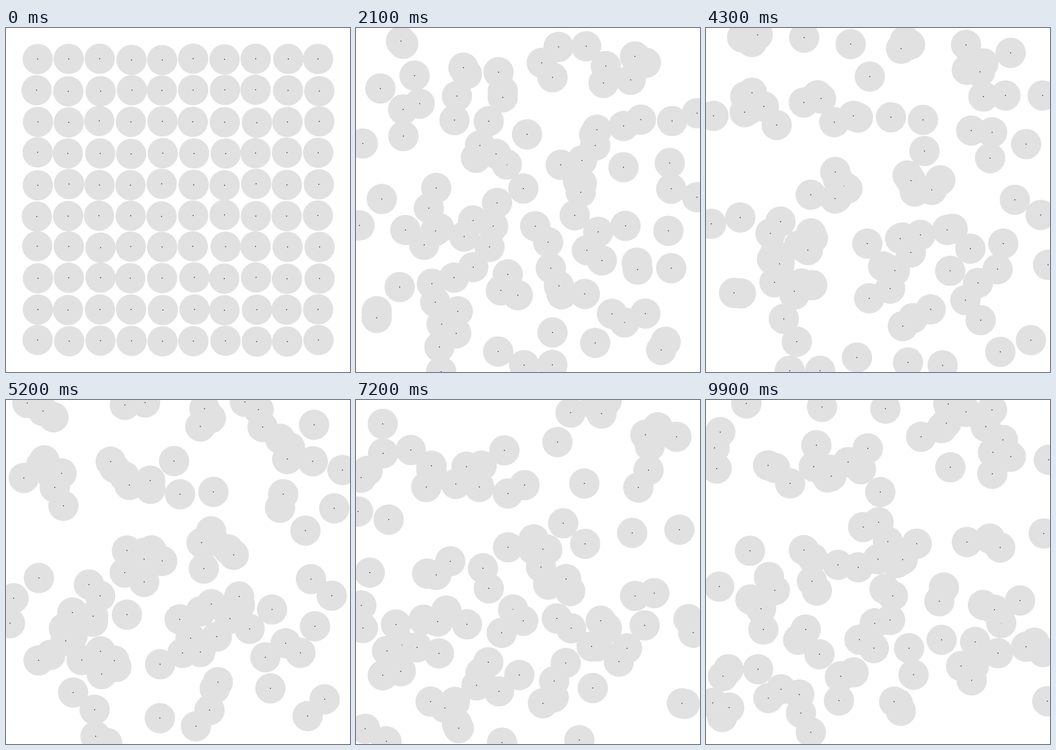
These frames come from a looping animation (748 by 748 pixels, 10 s). An HTML page with a canvas:

```html
<!DOCTYPE html>
<html lang="en">
<head>
<meta charset="utf-8">
<title>Wandering discs</title>
<style>
  html, body { margin: 0; width: 100%; height: 100%; overflow: hidden; background: #fff; }
  canvas { display: block; }
</style>
</head>
<body>
<canvas id="stage" width="748" height="748"></canvas>
<script>
const SIZE = 748, GRID = 10, GAP = SIZE / (GRID + 1);
const RADIUS = 33, PUSH = 2, TOP_SPEED = 4;
const STEPS = 100, STEP_MS = 100;
const ctx = document.getElementById('stage').getContext('2d');

let seed = 20;
function random() {
  seed = (seed + 0x6D2B79F5) | 0;
  let t = Math.imul(seed ^ (seed >>> 15), seed | 1);
  t ^= t + Math.imul(t ^ (t >>> 7), t | 61);
  return ((t ^ (t >>> 14)) >>> 0) / 4294967296;
}
const push = () => (random() * 2 - 1) * PUSH;
const wrap = v => (v + SIZE) % SIZE;

// Each step gives every disc a random push, caps its speed and wraps it at the edges.
function move(d) {
  let vx = d.vx + push(), vy = d.vy + push();
  const scale = Math.min(1, TOP_SPEED / Math.hypot(vx, vy));
  vx *= scale;
  vy *= scale;
  return { x: wrap(d.x + vx), y: wrap(d.y + vy), vx, vy };
}

let discs = Array.from({ length: GRID * GRID }, (_, i) => ({
  x: GAP * (i % GRID + 1),
  y: GAP * (Math.floor(i / GRID) + 1),
  vx: 0, vy: 0
}));
const poses = Array.from({ length: STEPS }, () => discs = discs.map(move));

function dot(x, y, r, color) {
  ctx.fillStyle = color;
  ctx.beginPath();
  ctx.arc(x, y, r, 0, Math.PI * 2);
  ctx.fill();
}

function draw() {
  const step = Math.floor(performance.now() / STEP_MS) % STEPS;
  ctx.fillStyle = '#fff';
  ctx.fillRect(0, 0, SIZE, SIZE);
  for (const { x, y } of poses[step]) {
    dot(x, y, RADIUS, '#e1e1e1');
    dot(x, y, 1, '#000');
  }
  requestAnimationFrame(draw);
}
draw();
</script>
</body>
</html>
```
